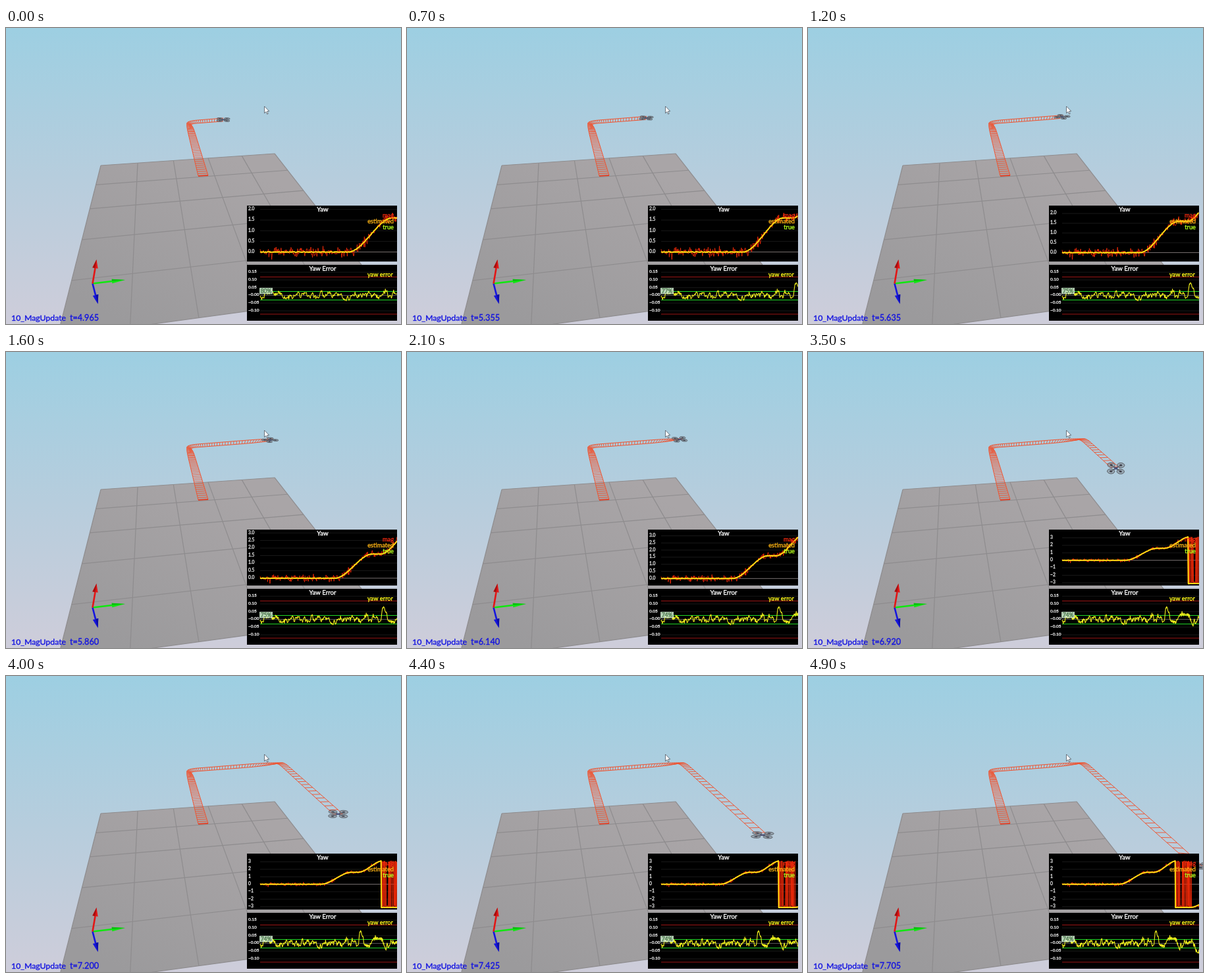
An HTML page with a canvas for the animation above (5 s loop, 600 by 450 pixels).

```html
<!DOCTYPE html>
<html lang="en">
<head>
<meta charset="utf-8">
<title>Yaw estimation flight</title>
<style>
  html, body { margin: 0; width: 100%; height: 100%; overflow: hidden; background: #b4cddd; }
  canvas { display: block; width: 600px; height: 450px; }
</style>
</head>
<body>
<canvas id="stage" width="600" height="450"></canvas>
<script>
const ctx = document.getElementById('stage').getContext('2d');
const LOOP = 5000, STEP = 100;
const T0 = 4.965, T1 = 7.705, DT = 0.02;

const clamp = u => Math.min(1, Math.max(0, u));
const ease = (t, from, to) => { const u = clamp((t - from) / (to - from)); return u * u * (3 - 2 * u); };
const bump = (t, at, width) => Math.exp(-(((t - at) / width) ** 2));
const wrap = a => a > Math.PI ? a - 2 * Math.PI : a;

// Two quarter turns, then the start of a third
const yawAt = t => 1.6 * ease(t, 3.2, 4.8) + 1.575 * ease(t, 5.15, 6.5) + 0.5 * ease(t, 7.25, 7.95);

// Climb, cross to the right, dive towards the viewer
function poseAt(t) {
  const climb = 1 - (1 - clamp((t - 2) / 2.4)) ** 2;
  const cross = ease(t, 3.95, 6.4);
  const dive = 86 * Math.max(0, t - 6.2) ** 1.7;
  return {
    x: 299.5 - 22 * climb + 141 * cross + dive,
    y: 224.5 - 81 * climb - 11 * cross + 0.9 * dive,
    size: 10 - 3.8 * climb + 0.6 * cross + 0.03 * dive,
    yaw: yawAt(t)
  };
}

function seeded(seed) {
  return () => {
    seed = (seed + 0x6d2b79f5) | 0;
    let r = Math.imul(seed ^ (seed >>> 15), 1 | seed);
    r = (r + Math.imul(r ^ (r >>> 7), 61 | r)) ^ r;
    return ((r ^ (r >>> 14)) >>> 0) / 4294967296;
  };
}

// Sampled signals over the whole flight
const samples = [];
{
  const rnd = seeded(41), bell = () => (rnd() + rnd() + rnd() + rnd() - 2) * 1.73;
  let drift = -0.015;
  for (let s = 0; s <= T1 + DT; s += DT) {
    const yaw = yawAt(s);
    drift = drift * 0.86 + bell() * 0.0095;
    samples.push({
      s,
      mag: wrap(yaw + bell() * 0.11),
      est: wrap(yaw + (rnd() - 0.5) * 0.03),
      err: drift + bell() * 0.004 + 0.085 * bump(s, 5.29, 0.13) + 0.055 * bump(s, 6.37, 0.14)
    });
  }
}

function path(points, color, width) {
  ctx.beginPath();
  points.forEach(([x, y]) => ctx.lineTo(x, y));
  ctx.strokeStyle = color; ctx.lineWidth = width; ctx.stroke();
}
function fill(points, color) {
  ctx.beginPath();
  points.forEach(([x, y]) => ctx.lineTo(x, y));
  ctx.closePath(); ctx.fillStyle = color; ctx.fill();
}
const line = (x1, y1, x2, y2, color, width = 1) => path([[x1, y1], [x2, y2]], color, width);
function text(str, x, y, size, color, align = 'left') {
  ctx.font = size + 'px Lato, "Open Sans", sans-serif';
  ctx.textAlign = align;
  ctx.fillStyle = ctx.strokeStyle = color;
  ctx.lineWidth = 0.35;
  ctx.fillText(str, x, y);
  ctx.strokeText(str, x, y);
}
function shade(x1, y1, x2, y2, colors) {
  const g = ctx.createLinearGradient(x1, y1, x2, y2);
  colors.forEach((c, i) => g.addColorStop(i / (colors.length - 1), c));
  return g;
}

// Perspective of the tiled floor
function floorAt(u, v) {
  const w = 1 + 0.0154 * u - 0.0985 * v;
  return [(144 + 59.08 * u - 20.9 * v) / w, (209 - 0.66 * u + 5.9 * v) / w];
}
function drawScene() {
  ctx.fillStyle = shade(0, 0, 0, 450, ['#9dcfe2', '#b6cddd', '#cecdda']);
  ctx.fillRect(0, 0, 600, 450);
  fill([floorAt(0, 0), floorAt(5, 0), floorAt(5, 5), floorAt(0, 5)], shade(330, 190, 180, 450, ['#a9a5a7', '#9b9a9c']));
  for (let i = 0; i <= 5; i++) {
    path([floorAt(i, 0), floorAt(i, 5)], '#8e8c8e', 1.2);
    path([floorAt(0, i), floorAt(5, i)], '#8e8c8e', 1.2);
  }
}

function drawAxis(x, y, dx, dy, half, color, dark) {
  const len = Math.hypot(dx, dy), nx = -dy / len * half, ny = dx / len * half;
  const tip = [x + dx, y + dy];
  line(131.5, 388.5, x, y, color, 2.6);
  fill([[x + nx, y + ny], tip, [x - nx, y - ny]], color);
  fill([[x, y], tip, [x - nx, y - ny]], dark);
}
function drawAxes() {
  drawAxis(161, 385, 20, -2, 3.2, '#0fe80f', '#0bbd10');
  drawAxis(136, 406, 3.5, 13.5, 4.4, '#1515df', '#0d0da4');
  drawAxis(135.5, 365, 2, -13, 4.2, '#e21616', '#a50e0e');
}

// A rung lies across the body and turns with it
function rungAt(t) {
  const { x, y, size, yaw } = poseAt(t);
  const dx = 0.75 * size * Math.cos(yaw), dy = 0.38 * size * Math.sin(yaw) - 0.05 * dx;
  return [[x - dx, y - dy], [x + dx, y + dy]];
}
function drawTrail(t) {
  const color = '#ef5330', rungs = [];
  for (let s = 2; s < t; s += 0.05) rungs.push(rungAt(s));
  rungs.forEach(r => path(r, color, 0.9));
  rungs.push(rungAt(t));
  for (const side of [0, 1]) path(rungs.map(r => r[side]), color, 1);
  path(rungs[0], '#e63b20', 2);
}

function drawDrone(t) {
  const { x, y, size, yaw } = poseAt(t);
  const flat = 0.28 + 0.5 * bump(t, 6.7, 0.4), reach = 1.25 * size;
  const oval = (cx, cy, r, color) => {
    ctx.beginPath();
    ctx.ellipse(cx, cy, r, r * flat, 0.05, 0, 7);
    ctx.fillStyle = color; ctx.fill();
  };
  for (let i = 0; i < 4; i++) {
    const a = yaw + (i + 0.5) * Math.PI / 2;
    const rx = x + reach * Math.cos(a), ry = y + reach * flat * Math.sin(a);
    line(x, y, rx, ry, '#4c5060', 1.5);
    oval(rx, ry, 0.68 * size, 'rgba(130,136,144,.55)');
    ctx.strokeStyle = '#5a5f66'; ctx.lineWidth = 1; ctx.stroke();
    oval(rx, ry, 0.25 * size, '#3b3b45');
  }
  oval(x, y, 0.32 * size, '#494f78');
}

function drawCursor() {
  const p = [[392.5, 119], [392.5, 129.5], [394.9, 127.3], [396.7, 131], [398.2, 130.3], [396.6, 126.7], [399.7, 126.4]];
  fill(p, '#fff');
  path([...p, p[0]], '#4c5560', 0.8);
}

function panel(y, title, draw) {
  ctx.save();
  ctx.beginPath(); ctx.rect(366, y, 228, 85); ctx.clip();
  ctx.fillStyle = '#000'; ctx.fillRect(366, y, 228, 85);
  draw();
  text(title, 481, y + 9, 9.7, '#fff', 'center');
  ctx.restore();
}
// The whole history is squeezed into the plot width
function plot(seen, t, key, toY, color, width) {
  path(seen.map(p => [386 + 208 * p.s / t, toY(p[key])]), color, width);
}

function drawYaw(t, seen) {
  const values = seen.map(p => p.mag);
  const low = Math.min(...values), range = Math.max(...values) - low;
  const toY = v => 352 - (v - low) * 71 / range;
  const step = range > 5 ? 1 : 0.5;
  panel(270, 'Yaw', () => {
    for (let v = -3; v <= 3; v += step) {
      const y = toY(v);
      if (y < 273 || y > 352) continue;
      line(386, y, 594, y, v ? '#191919' : '#77706f');
      text(v.toFixed(step < 1 ? 1 : 0).replace('-', '−'), 368, y + 1.4, 6.7, '#e4e4e4');
    }
    plot(seen, t, 'mag', toY, '#f02a08', 0.9);
    plot(seen, t, 'est', toY, '#ffae00', 1.9);
    plot(seen, t, 'est', toY, '#fff01c', 1.2);
    text('mag', 589, 288, 9.3, '#f22a10', 'right');
    text('estimated', 589, 297, 9.2, '#ffb414', 'right');
    text('true', 589, 305.5, 9.3, '#b4ff1c', 'right');
  });
}

function drawError(t, seen, share) {
  const toY = v => 406.5 - v * 235;
  panel(360, 'Yaw Error', () => {
    for (let i = 3; i >= -2; i--) {
      const y = toY(i * 0.05);
      line(386, y, 594, y, i ? '#181818' : '#555');
      text((i > 0 ? '' : '−') + Math.abs(i * 0.05).toFixed(2), 368, y + 0.8, 6.5, '#e4e4e4');
    }
    for (const y of [378.5, 435]) line(386, y, 594, y, '#9c1414');
    for (const y of [400.5, 413.5]) line(386, y, 594, y, '#20d828', 1.2);
    plot(seen, t, 'err', toY, '#f0f01c', 1.1);
    ctx.fillStyle = 'rgba(205,232,205,.88)'; ctx.fillRect(385, 395, 20, 9.5);
    text(Math.round(share) + '%', 395, 403, 8.5, '#4c794c', 'center');
    text('yaw error', 588, 377.5, 9.3, '#fff81c', 'right');
  });
}

function draw(ms) {
  const now = Math.floor((ms % LOOP) / STEP) * STEP;
  const t = Math.round((T0 + (T1 - T0) * now / (LOOP - STEP)) * 200) / 200;
  const seen = samples.filter(p => p.s <= t);
  ctx.lineJoin = 'round';
  drawScene();
  drawTrail(t);
  drawDrone(t);
  drawAxes();
  drawYaw(t, seen);
  drawError(t, seen, 74 + 6 * Math.exp(-now / 800));
  text('10_MagUpdate', 8, 444.5, 12.3, '#1414e0');
  text('t=' + t.toFixed(3), 97, 444.5, 12.6, '#1414e0');
  drawCursor();
}

const start = performance.now();
function tick() {
  draw(performance.now() - start);
  requestAnimationFrame(tick);
}
tick();
</script>
</body>
</html>
```
